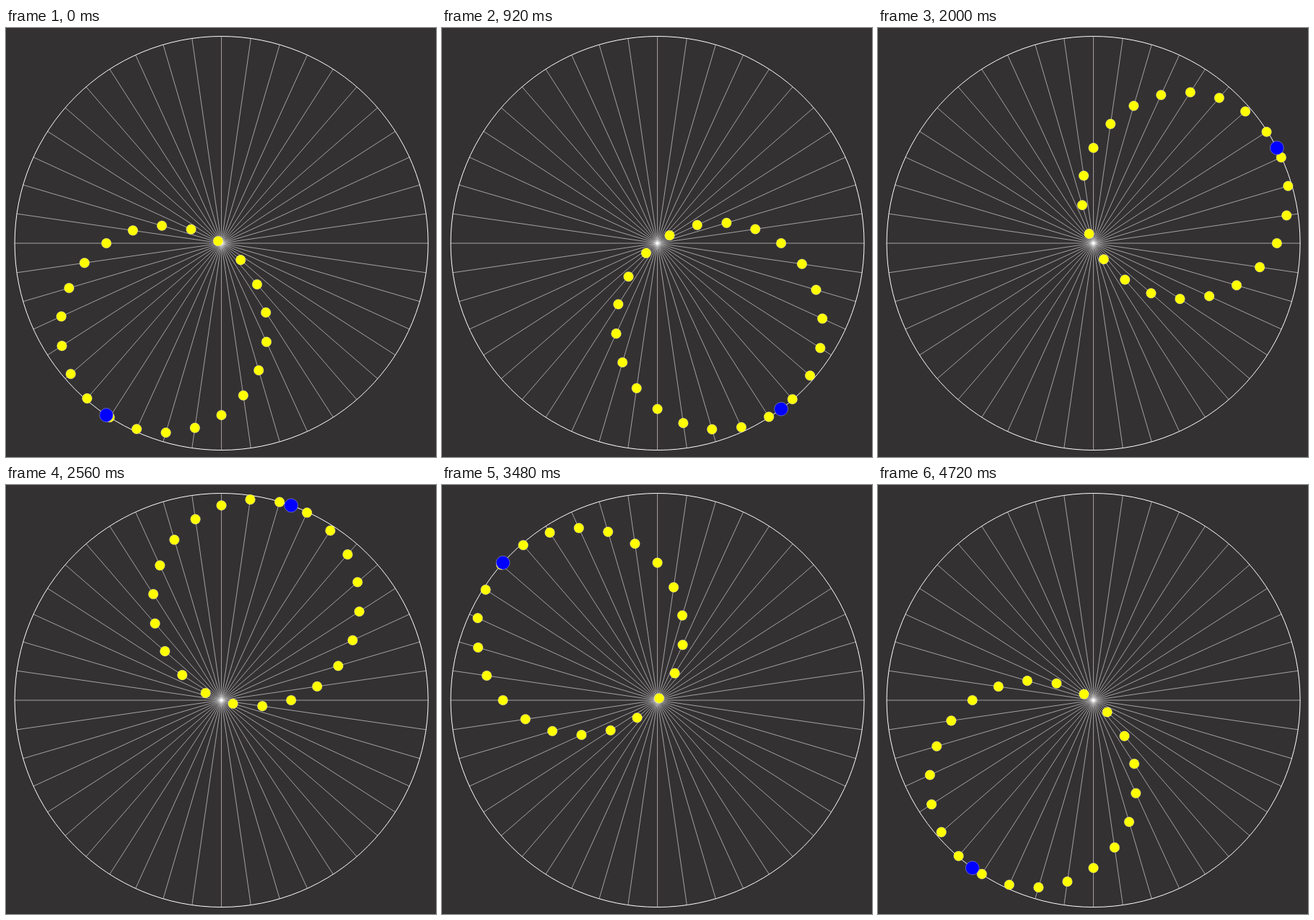
Animation, 596 px wide and 594 px high, one loop 4.76 s. Source, as an HTML page with a canvas:

```html
<!DOCTYPE html>
<html lang="en">
<head>
<meta charset="utf-8">
<title>Rolling circle of straight lines</title>
<style>
  html, body { margin: 0; width: 100%; height: 100%; overflow: hidden; background: #343133; }
  canvas { display: block; }
</style>
</head>
<body>
<canvas id="stage" width="596" height="594"></canvas>
<script>
const ctx = document.getElementById('stage').getContext('2d');
const CX = 298.6, CY = 298, RADIUS = 286.5;
const DIAMETERS = 22;
const LOOP = 4760, FRAME = 40;
const START = 123.83 * Math.PI / 180;
const STEP = 0.044;
const STEPS_PER_FRAME = 1.2;

function disc(x, y, r, color) {
  ctx.beginPath();
  ctx.arc(x, y, r, 0, 2 * Math.PI);
  ctx.fillStyle = color;
  ctx.fill();
  ctx.lineWidth = 0.4;
  ctx.strokeStyle = 'rgba(255,255,255,0.8)';
  ctx.stroke();
}

function drawWheel() {
  ctx.fillStyle = '#343133';
  ctx.fillRect(0, 0, 596, 594);
  ctx.strokeStyle = '#fff';
  ctx.lineWidth = 0.55;
  for (let i = 0; i < DIAMETERS; i++) {
    const a = i * Math.PI / DIAMETERS;
    const dx = RADIUS * Math.cos(a), dy = RADIUS * Math.sin(a);
    ctx.beginPath();
    ctx.moveTo(CX - dx, CY - dy);
    ctx.lineTo(CX + dx, CY + dy);
    ctx.stroke();
  }
  ctx.lineWidth = 1;
  ctx.beginPath();
  ctx.arc(CX, CY, RADIUS, 0, 2 * Math.PI);
  ctx.stroke();
}

function draw(time) {
  const frame = Math.floor((time % LOOP) / FRAME);
  const angle = START - STEP * Math.round(frame * STEPS_PER_FRAME);
  drawWheel();
  // Each dot is the leading point projected onto its own diameter.
  for (let i = 0; i < DIAMETERS; i++) {
    const a = i * Math.PI / DIAMETERS;
    const d = RADIUS * Math.cos(angle - a);
    disc(CX + d * Math.cos(a), CY + d * Math.sin(a), 6.8, '#ff0');
  }
  disc(CX + RADIUS * Math.cos(angle), CY + RADIUS * Math.sin(angle), 9.4, '#00f');
}

const begin = performance.now();
function tick() {
  draw(performance.now() - begin);
  requestAnimationFrame(tick);
}
tick();
</script>
</body>
</html>
```
